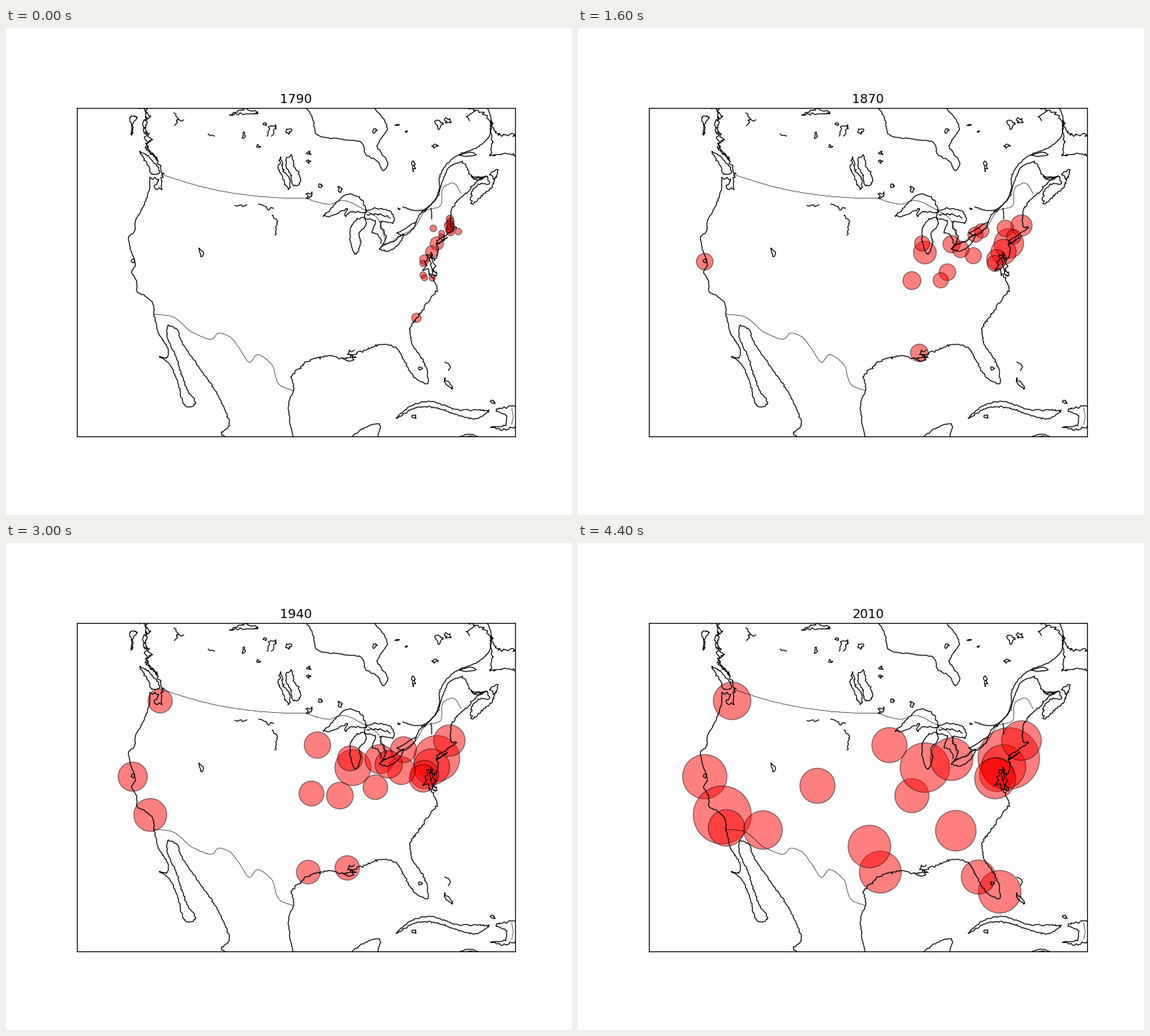
A matplotlib script that plays this animation: 806x694 px, repeating every 4600 ms.

```python
import numpy as np
import matplotlib.pyplot as plt
from matplotlib.animation import FuncAnimation

W, H, DPI = 806, 694, 100
PX = 72 / DPI                      # points per pixel
L, R, T, B = 100.8, 725.4, 113.8, 581.8
FIRST, LAST, STEP = 1790, 2010, 10
rng = np.random.default_rng(7)

fig = plt.figure(figsize=(W / DPI, H / DPI), dpi=DPI, facecolor="white")
ax = fig.add_axes([L / W, 1 - B / H, (R - L) / W, (B - T) / H])
ax.set(xlim=(L, R), ylim=(B, T), xticks=[], yticks=[])
for spine in ax.spines.values():
    spine.set_linewidth(1.25 * PX)
title = fig.text((L + R) / 2 / W, 1 - 107 / H, "", fontsize=18 * PX,
                 family="DejaVu Sans", ha="center", va="baseline")


def shore(rough, *xy, width=1.25):
    """Smooth curve through a few key points, shaken by seeded noise."""
    p = np.array(xy, float).reshape(-1, 2)
    t = np.r_[0, np.cumsum(np.hypot(*np.diff(p, axis=0).T))]
    slope = np.gradient(p, t, axis=0)
    s = np.linspace(0, t[-1], max(4, int(t[-1] / 2.2)))
    i = np.clip(np.searchsorted(t, s, "right") - 1, 0, len(t) - 2)
    h = (t[i + 1] - t[i])[:, None]
    u = (s - t[i])[:, None] / h
    c = ((1 + 2 * u) * (1 - u) ** 2 * p[i] + u * (1 - u) ** 2 * h * slope[i]
         + u * u * (3 - 2 * u) * p[i + 1] + u * u * (u - 1) * h * slope[i + 1])
    c[1:-1] += rng.normal(0, rough, (len(c) - 2, 2))
    ax.plot(c[:, 0], c[:, 1], color="black", lw=width * PX, zorder=3)


def isle(rough, *xy):
    shore(rough, *xy, *xy[:2])


def border(*xy):
    shore(0.15, *xy, width=0.62)


def lake(x, y, w, h):
    """Small ragged closed outline."""
    a = np.arange(0, 2 * np.pi, 0.6)
    r = rng.uniform(0.2, 1, len(a)) / 2
    isle(0.5, *np.c_[x + w * r * np.cos(a), y + h * r * np.sin(a)].ravel())


# Pacific coast and Baja California
shore(0.5, 205, 213, 204, 232, 192, 261, 184, 275, 183, 290, 175, 297, 177, 313,
      183, 341, 180, 346, 186, 362, 187, 376, 200, 383, 209, 393, 211, 408)
lake(181, 332, 5, 8)
shore(0.6, 211, 408, 218, 436, 231, 460, 229, 470, 219, 468, 232, 478, 243, 501,
      261, 540, 269, 537, 258, 515, 242, 468, 230, 438, 231, 424, 244, 430,
      250, 446, 272, 479, 306, 532, 316, 569, 307, 578, 314, 583)

# British Columbia and Puget Sound
shore(1.9, 189, 112, 202, 121, 196, 142, 204, 158, 199, 167, 207, 180, 219, 192,
      222, 210)
shore(1.7, 199, 113, 200, 140, 204, 175, 213, 187)
shore(1.3, 222, 210, 220, 228, 213, 230, 217, 216, 205, 213)
isle(0.8, 191, 176, 203, 183, 217, 208, 207, 207, 202, 196)
isle(1.2, 177, 127, 186, 126, 180, 139, 179, 151)

# Gulf of Mexico and Florida
shore(0.4, 409, 582, 404, 560, 404, 530, 410, 514, 406, 497)
shore(1.0, 406, 497, 414, 488, 437, 472, 462, 467, 486, 471, 496, 464, 518, 457,
      530, 452, 552, 454, 560, 461)
shore(1.6, 479, 470, 489, 474, 497, 470, 485, 463, 496, 459)
shore(0.6, 560, 461, 566, 472, 583, 499, 600, 506, 598, 483, 578, 448, 575, 428)

# Atlantic coast
shore(0.8, 575, 428, 585, 413, 604, 386, 613, 374, 609, 356)
shore(1.6, 609, 356, 602, 350, 597, 335, 602, 325, 606, 343, 610, 354, 609, 334,
      605, 320)
shore(0.7, 605, 320, 609, 331, 616, 318, 613, 304, 626, 296, 637, 287, 642, 284,
      636, 285, 633, 270, 636, 255)
isle(0.5, 613, 308, 628, 299, 618, 306)
shore(1.1, 636, 255, 645, 245, 660, 231, 668, 222)
shore(0.9, 668, 222, 684, 213, 688, 220, 674, 223, 662, 240, 664, 250, 676, 240,
      692, 226, 699, 212)
isle(1.1, 689, 209, 699, 203, 695, 214)
isle(0.7, 663, 211, 680, 214, 670, 217)
shore(0.9, 686, 212, 662, 211, 657, 199, 650, 190)
shore(0.4, 650, 190, 634, 196, 618, 228, 611, 245, 592, 262)
shore(0.4, 597, 261, 618, 231, 617, 215, 640, 183, 671, 170, 689, 152, 690, 134)
shore(1.3, 690, 134, 684, 124, 668, 118, 656, 112)
shore(1.0, 668, 117, 657, 126, 660, 132)
shore(0.9, 682, 112, 690, 124, 691, 134)
isle(0.3, 646, 181, 663, 177.5, 669, 180, 655, 183)
shore(1.4, 727, 152, 708, 152, 698, 150, 692, 134, 692, 165, 691, 182, 703, 180,
      727, 180)

# Hudson Bay
shore(0.5, 426, 112, 437, 129, 441, 149, 480, 159, 508, 165, 511, 178, 530, 191,
      538, 203, 543, 196, 529, 167, 543, 143, 527, 117, 522, 112)

# Great Lakes and the river to the sea
isle(0.7, 452, 268, 474, 246, 482, 238, 506, 244, 512, 262, 492, 262, 482, 268,
     487, 258, 466, 267)
isle(0.6, 500, 272, 494, 279, 490, 300, 498, 322, 505, 305, 503, 294, 513, 278,
     511, 271)
shore(0.8, 511, 271, 512, 264, 550, 265, 552, 277, 534, 276, 541, 300, 535, 312)
shore(0.7, 511, 271, 526, 275, 522, 291, 530, 294, 534, 307)
shore(1.0, 514, 266, 531, 266, 547, 271)
isle(0.6, 532, 315, 538, 309, 552, 304, 565, 295, 562, 304, 539, 318)
isle(0.5, 557, 292, 573, 283, 584, 276, 579, 287, 562, 295)
shore(0.4, 584, 276, 592, 263, 597, 261)
shore(0.5, 565, 255, 576, 259, 597, 260)
shore(0.5, 605, 257, 606, 272)

# Lake Winnipeg and its neighbour
isle(1.2, 391, 184, 388, 199, 393, 213, 402, 228, 404, 220, 396, 203)
isle(1.0, 406, 181, 398, 189, 404, 206, 413, 225, 418, 221, 410, 194)

# Caribbean and Yucatan
isle(0.7, 556, 556, 574, 540, 600, 532, 637, 543, 687, 547, 665, 557, 645, 552,
     610, 541, 586, 541)
shore(0.8, 727, 538, 698, 545, 712, 553, 712, 565, 691, 568, 708, 572, 727, 567)
shore(0.5, 493, 582, 505, 573, 532, 565, 530, 582)
isle(0.4, 647, 582, 660, 579, 671, 582)
shore(0.9, 625, 476, 633, 481, 630, 488)
isle(0.9, 625, 499, 625, 506, 636, 514)

# Inland lakes and reservoirs
isle(0.5, 275, 314, 281, 321, 279, 326)
shore(1.1, 326, 253, 343, 252)
shore(1.1, 360, 251, 369, 253, 372, 258, 381, 257)
shore(1.2, 379, 267, 384, 271, 383, 295)
shore(1.1, 239, 121, 244, 129, 240, 139)
shore(1.0, 243, 131, 253, 131)
shore(0.8, 288, 151, 297, 154)
isle(0.9, 319, 124, 341, 116, 359, 120)
shore(1.2, 372, 154, 377, 140, 384, 139, 378, 154)
for spot in [(339, 154, 10, 15), (369, 137, 8, 6), (358, 169, 9, 6),
             (402, 148, 13, 12), (431, 178, 8, 6), (430, 190, 8, 5),
             (432, 239, 12, 13), (447, 225, 9, 7), (476, 230, 9, 11),
             (525, 146, 7, 11), (557, 138, 6, 4), (570, 147, 7, 4),
             (580, 196, 8, 20), (617, 137, 15, 17), (629, 133, 13, 11),
             (610, 168, 11, 7), (559, 258, 5, 4), (581, 554, 8, 7),
             (693, 533, 9, 6), (590, 485, 6, 6)]:
    lake(*spot)

# Land borders
border(222, 209, 280, 226.5, 340, 237.7, 400, 242.3, 427, 242.5)
border(427, 242.5, 446, 249, 462, 251, 476, 246, 512, 260, 528, 270, 540, 301)
border(535, 312, 558, 299, 583, 282, 598, 260, 618, 254, 624, 226, 637, 221,
       648, 236)
border(211, 408, 236, 411, 268, 435, 297, 441, 300, 436, 317, 439, 332, 456,
       348, 476, 357, 466, 377, 478, 390, 509, 410, 517)
border(720, 541, 722, 556, 720, 565)

cities = []


def city(x, y, first, last, start=1.0, end=None):
    """Start and end weigh the radius against the smallest ranked city."""
    cities.append((x, y, first, last, start, start if end is None else end))


def smallest(year):
    return 4.3 + 20 * ((year - FIRST) / (LAST - FIRST)) ** 1.2


# Old seaports
city(613.5, 307, FIRST, LAST, 2.2, 1.8)
city(606, 319, FIRST, LAST, 2.0, 1.3)
city(631.5, 281.5, FIRST, LAST, 1.66, 1.16)
city(596, 330, FIRST, LAST, 1.6, 1.0)
city(594, 335.5, FIRST, LAST, 1.05, 1.2)
city(584.5, 413, FIRST, 1850, 1.55, 1.0)
city(608.5, 285.5, FIRST, 1880, 1.1, 1.15)
city(594, 352, FIRST, 1850, 1.05)
city(607, 356.5, FIRST, 1840)
city(620.5, 297.5, FIRST, 1870)
city(620.5, 292.5, FIRST, 1800)
city(596, 356, FIRST, 1820)
city(644, 290, FIRST, 1820, 1.1)
city(631, 288, FIRST, 1850, 1.15)
city(633, 265, 1800, 1850)
for k in range(6):
    city(632 + k % 2, 272 + 3.8 * k, FIRST, 1800 + k % 3 * STEP, 1.2)

# River and lake towns
city(486, 463, 1810, 1950, 1.4, 1.0)
city(563, 324.5, 1810, 1990, 1.08, 1.2)
city(526, 348, 1820, 1960, 1.25, 1.0)
city(516.5, 359.5, 1830, 1900, 1.0, 1.1)
city(575, 289, 1830, 1900)
city(566, 294.5, 1830, 1960, 1.03, 1.1)
city(475.5, 360, 1840, LAST, 1.3, 1.0)
city(494, 320, 1850, LAST, 1.6, 1.45)
city(532, 308, 1860, LAST, 1.2, 1.25)
city(545, 315.5, 1860, 1980, 1.15)
city(490, 307, 1860, 1970, 1.05)

# West and the Sun Belt
city(180.5, 333, 1860, LAST, 1.15, 1.3)
city(443.5, 288, 1880, LAST, 1.18, 1.03)
city(435, 357, 1890, 1960, 1.05)
city(205.5, 387.5, 1910, LAST, 1.25, 1.7)
city(219.5, 225, 1910, LAST, 0.98, 1.1)
city(510.5, 342.5, 1910, 1930)
city(430.5, 469, 1940, LAST, 1.0, 1.23)
city(415, 432.5, 1960, LAST, 1.13, 1.25)
city(211.5, 406, 1970, LAST, 1.02, 1.07)
city(538, 410, 1970, LAST, 1.02, 1.19)
city(600.5, 497, 1970, LAST, 1.15, 1.25)
city(263.5, 409, 1980, LAST, 1.0, 1.13)
city(570, 476, 1990, LAST)
city(341, 346, 2000, LAST, 1.0, 1.03)

dots = ax.scatter([], [], facecolor="red", edgecolor="black", alpha=0.5,
                  linewidth=1.25 * PX, zorder=2)


def draw(i):
    year = FIRST + STEP * i
    shown = np.array([
        (x, y, smallest(year) * np.interp(year, (first, last), (start, end)))
        for x, y, first, last, start, end in cities if first <= year <= last])
    dots.set_offsets(shown[:, :2])
    dots.set_sizes((2 * shown[:, 2] * PX) ** 2)
    title.set_text(str(year))
    return dots, title


anim = FuncAnimation(fig, draw, frames=(LAST - FIRST) // STEP + 1, interval=200,
                     repeat=True, repeat_delay=0, blit=False)
plt.show()
```
